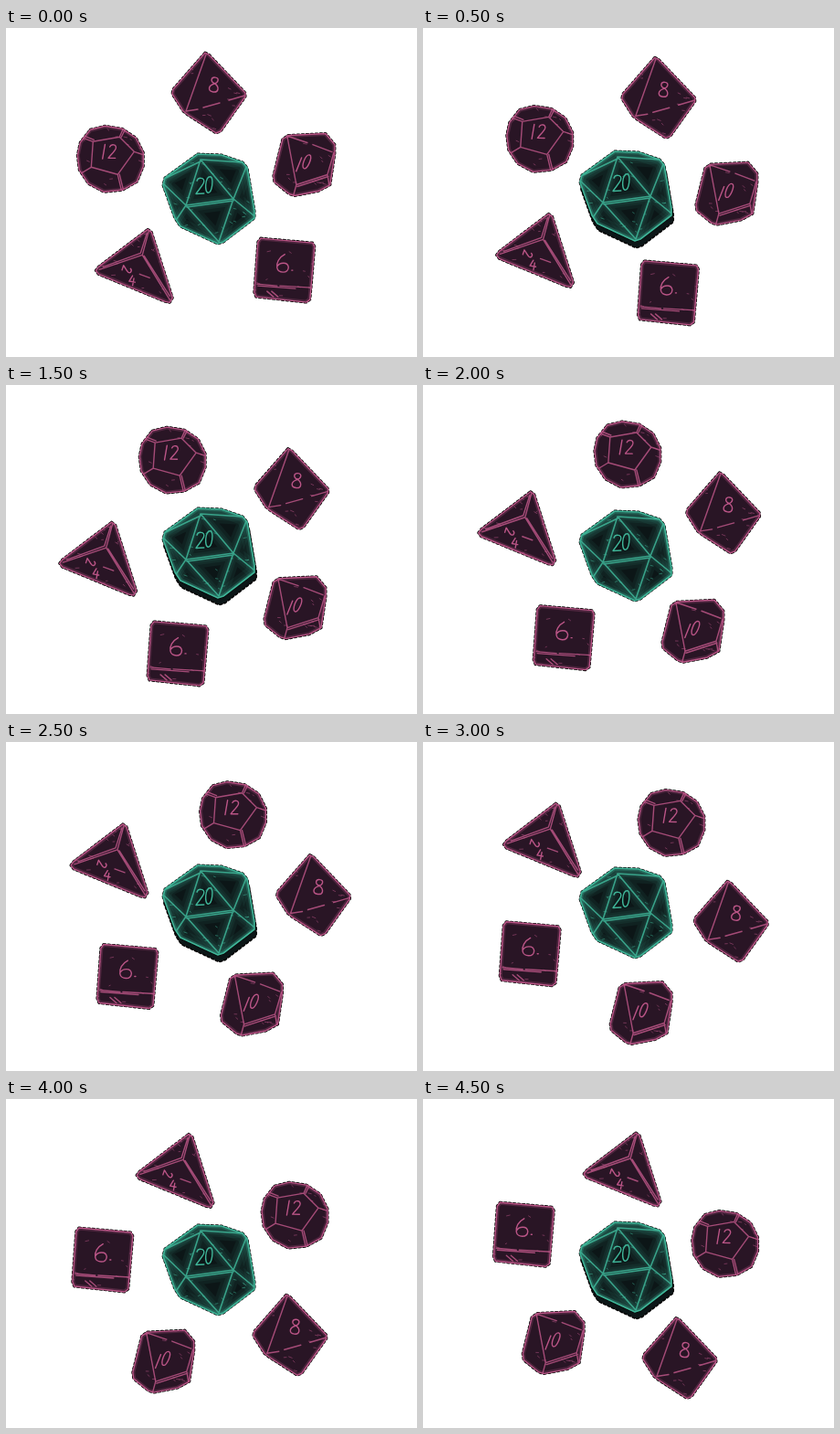
Recreate the animation shown at these times as an HTML page with a canvas. Size 450 by 360 pixels, loop 5000 ms.

```html
<!DOCTYPE html>
<html lang="en">
<head>
<meta charset="utf-8">
<title>Dice circle</title>
<style>
  html, body { margin: 0; width: 100%; height: 100%; overflow: hidden; background: #fff; }
  canvas { display: block; }
</style>
</head>
<body>
<canvas id="stage" width="450" height="360"></canvas>
<script>
const ctx = document.getElementById('stage').getContext('2d');
const STEP = 500, STEPS = 10;
const CENTER = { x: 220, y: 186 };
const KEY_STEPS = [0, 2, 4, 7, 9];
const PINK = '#bb5587', PLUM = '#291525', TEAL = '#3fb598', INK = '#0c1617';

// Hand-drawn numerals, about 16 px high around their own centre
const GLYPHS = {
  0: 'M0-8C-5-8-5 8-1 8S4-8 0-8',
  1: 'M0-8L-.5 8',
  2: 'M-4-5C-3-9 4-9 3-4 2 0-2 4-4 8L4 7',
  4: 'M-1-8L-5 2H5M2-4V8',
  6: 'M1-8C-4-5-6 0-5 4-4 9 5 9 5 3 4-2-3-1-5 3',
  8: 'M1-1C-6-3-4-8 0-8 5-8 4-3 0-1-7 2-6 8 0 8 6 8 6 2 1-1',
  '.': 'M0 0h1'
};

// angles: orbit angle at each key step; orbit: radius and its mid-way swell
// marks: [glyph, x, y, rotation in degrees, scale]
const dice = [
  {
    outline: 'M-4-44L0-42 40 0 40 4 13 42 8 44-23 24-28 20-40 1-39-4Z',
    edges: 'M-3-42L-25 20M-25 20L-12 18M-6 16L12 11M22 8L39 3',
    marks: [[8, 6, -9, 8, 1]],
    angles: [-89, -53, -23, 19, 58], orbit: [115, 3]
  },
  {
    outline: 'M-22-32L-6-36 13-33 28-23 36-7 36 8 29 25 13 34-7 36-24 27-34 12-36-4-33-18Z',
    edges: 'M10-24L26-8 8 17-21 9-19-19ZM10-24L14-33M12-24L16-32M26-8L35-5M8 17L12 34M10 17L14 33M-21 9L-31 15M-19-19L-30-23M-18-21L-28-25',
    marks: [[1, -7, -8, 8, 1], [2, 2.5, -8, 8, .95]],
    angles: [-158, -132, -88, -49, -14], orbit: [114, -4]
  },
  {
    outline: 'M-17-32L24-34 34-22 34-12 29 22 16 29-10 34-16 32-32 19-33 12-23-28Z',
    edges: 'M-18-31L-8 22 26 11 33-13M-17-31L4-24M10-22L31-14M-7 24L27 13M-8 22L-11 33M26 11L28 22',
    marks: [[1, -5, 0, 20, 1], [0, 4, -3, 20, 1]],
    angles: [-19, 14, 48, 97, 134], orbit: [112, 0]
  },
  {
    outline: 'M-26-35L31-30 33-26 28 32 24 35-31 29-33 24-29-31Z',
    edges: 'M-30 15L-8 17M-5 17L30 19M-29 17L12 20M-19 23L-12 29M-14 23L-7 29',
    marks: [[6, -1.5, -7.5, 4, 1.25], ['.', 8, 0, 0, 1]],
    angles: [43, 87, 126, 171, 199], orbit: [116, -4]
  },
  {
    outline: 'M15-40L19-37 42 35 39 40 34 39-39 9-42 5-39 1Z',
    edges: 'M16-38L9-12-38 4M14-36L7-14-34 1M9-12L39 37M11-11L39 33M6 9L17 13',
    marks: [[2, -8, 4, 115, .65], [4, -2, 16, 10, .65]],
    angles: [137, 162, 194, 235, 269], orbit: [109, 12]
  }
];

const d20 = {
  outline: 'M-12-48L14-47 37-39 42-33 50 14 50 22 16 48 10 50-31 31-37 22-50-14-48-22Z',
  edges: 'M-9-42L-25 8 27 1ZM-25 8L-49-15M-25 8L-35 23M-25 8L11 48 27 1 49 19M27 1L41-34M-9-42L37-39M-47-22L-9-40M-24 10L27 3',
  marks: [[2, -9, -13, 4, 1.1], [0, 1, -14.5, 4, 1.1]]
};

for (const die of [...dice, d20]) {
  die.outline = new Path2D(die.outline);
  die.edges = new Path2D(die.edges);
}

function stroke(path, color, width, alpha = 1) {
  ctx.globalAlpha = alpha;
  ctx.strokeStyle = color;
  ctx.lineWidth = width;
  ctx.stroke(path);
  ctx.globalAlpha = 1;
}

// Short pen scratches scattered over the faces
function scratches(seed) {
  const path = new Path2D();
  const random = () => (seed = seed * 16807 % 2147483647) / 2147483647;
  for (let i = 0; i < 24; i++) {
    const angle = random() * 2 * Math.PI, radius = 20 + random() * 23;
    const x = radius * Math.cos(angle), y = radius * Math.sin(angle);
    path.moveTo(x, y);
    path.lineTo(x + 1 + random() * 3, y - 1 + random() * 3);
  }
  return path;
}

function drawBody(die, fill) {
  ctx.setLineDash([2, 3]);
  stroke(die.outline, '#000', 3);
  ctx.setLineDash([]);
  ctx.fillStyle = fill;
  ctx.fill(die.outline);
}

function drawLines(die, color, width, seed) {
  ctx.save();
  ctx.clip(die.outline);
  stroke(scratches(seed), color, 1, .5);
  stroke(die.outline, color, 5, .25);
  ctx.restore();
  stroke(die.edges, color, width, .85);
  stroke(die.outline, color, width);
  for (const [glyph, x, y, degrees, scale] of die.marks) {
    ctx.save();
    ctx.translate(x, y);
    ctx.rotate(degrees * Math.PI / 180);
    ctx.scale(scale, scale);
    stroke(new Path2D(GLYPHS[glyph]), color, 1.4 / scale);
    ctx.restore();
  }
}

function drawHaze(die, color) {
  ctx.save();
  ctx.clip(die.outline);
  for (const width of [18, 11, 6]) {
    stroke(die.edges, color, width, .08);
    stroke(die.outline, color, width, .08);
  }
  ctx.restore();
}

function at(x, y, draw) {
  ctx.save();
  ctx.translate(x, y);
  draw();
  ctx.restore();
}

function orbitPoint({ angles, orbit: [radius, swell] }, step) {
  const next = Math.max(1, KEY_STEPS.findIndex(key => key >= step));
  const from = KEY_STEPS[next - 1], to = KEY_STEPS[next];
  const part = (step - from) / (to - from);
  const angle = (angles[next - 1] + (angles[next] - angles[next - 1]) * part) * Math.PI / 180;
  const r = radius + swell * Math.sin(Math.PI * step / (STEPS - 1));
  return [CENTER.x + r * Math.cos(angle), CENTER.y + r * Math.sin(angle)];
}

function frame(now) {
  const step = Math.floor(now / STEP) % STEPS, odd = step % 2;
  ctx.fillStyle = '#fff';
  ctx.fillRect(0, 0, 450, 360);
  ctx.lineCap = ctx.lineJoin = 'round';

  dice.forEach((die, i) => at(...orbitPoint(die, step), () => {
    drawBody(die, PLUM);
    drawLines(die, PINK, 1.4, 71 + 997 * i);
  }));

  // The central die twitches: its lines lift off the dark body on odd steps
  if (odd) at(223.5, 190, () => drawBody(d20, INK));
  at(222, odd ? 183 : 186, () => {
    drawBody(d20, INK);
    drawHaze(d20, TEAL);
    drawLines(d20, TEAL, 1.6, odd ? 4211 : 1733);
  });
}

const start = performance.now();
function tick() {
  frame(performance.now() - start);
  requestAnimationFrame(tick);
}
tick();
</script>
</body>
</html>
```
